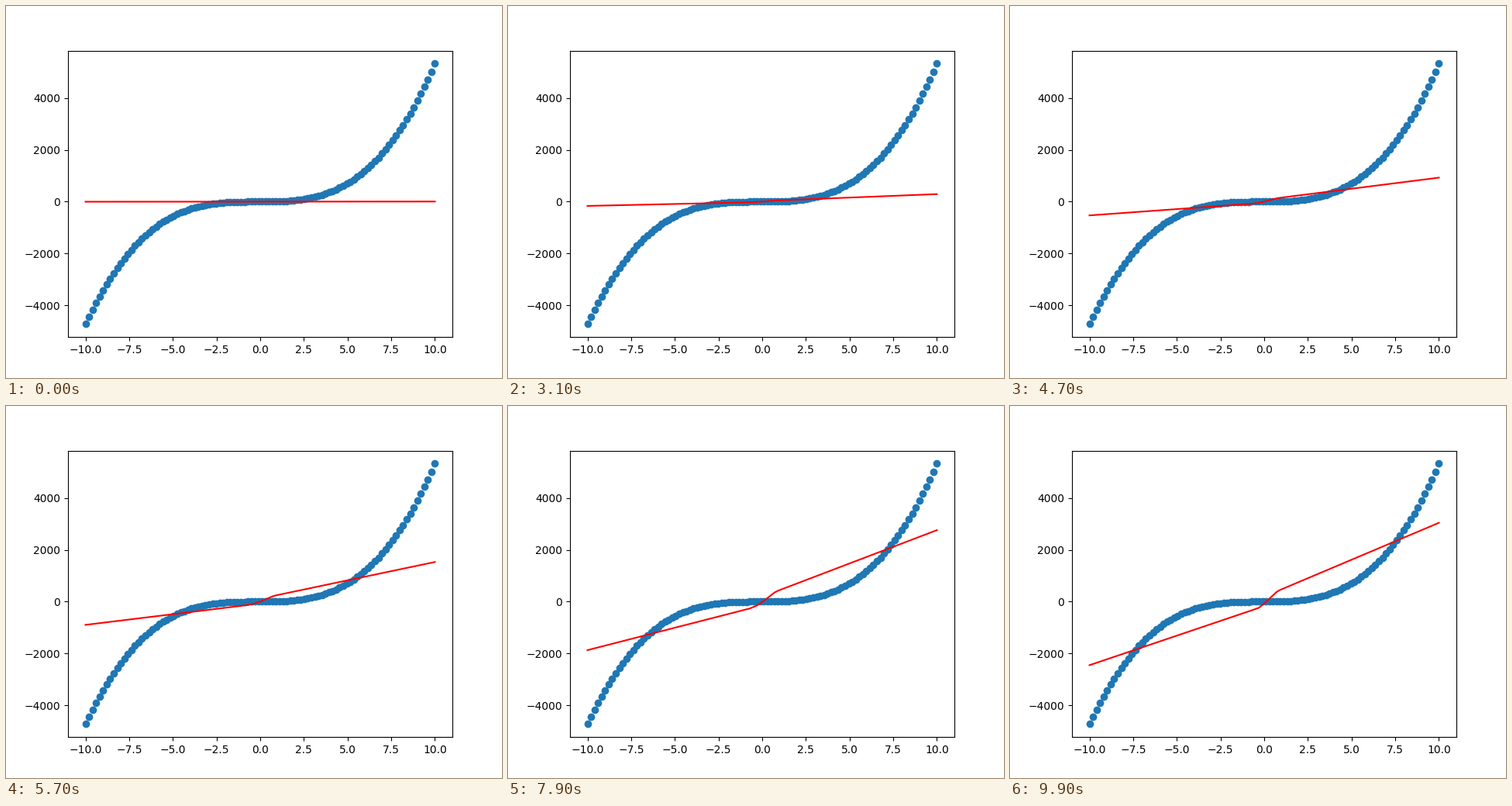
Animation, 640 px wide and 480 px high, one loop 10000 ms. Source, as a matplotlib script:

```python
import numpy as np
import matplotlib.pyplot as plt
from matplotlib.animation import FuncAnimation

FRAMES = 100

x = np.linspace(-10, 10, 100)
y = 5 * x**3 + 3 * x**2 + 2 * x


def growth(steps, values):
    """Smooth growth curve: a polynomial in log space through key points."""
    log_curve = np.poly1d(np.polyfit(steps, np.log(values), len(steps) - 1))
    return lambda t: np.exp(log_curve(t))


steps = [15, 31, 55, 67, 79, 99]
right_end = growth(steps, [50, 290, 1400, 2172, 2757, 3040])
left_end = growth(steps, [30, 165, 815, 1333, 1870, 2450])


def fit(t):
    """Piecewise linear fit: two long arms joined by a steep middle."""
    left, right = -left_end(t), right_end(t)
    bend = 0.16 - 0.00025 * t               # bend height relative to arm end
    sag = 70 * (max(t - 60, 0) / 39) ** 2   # the middle sinks late in training
    knots = [-10, -0.7, -0.3, 0, 0.77, 10]
    heights = [left, bend * left, bend * left / 2 - sag, -sag,
               bend * right, right]
    return np.interp(x, knots, heights)


fig, ax = plt.subplots(figsize=(6.4, 4.8), dpi=100)
ax.scatter(x, y)
line, = ax.plot(x, fit(0), "r-")


def update(t):
    line.set_ydata(fit(t))
    return line,


anim = FuncAnimation(fig, update, frames=FRAMES, interval=100,
                     repeat=True, repeat_delay=0)
plt.show()
```
